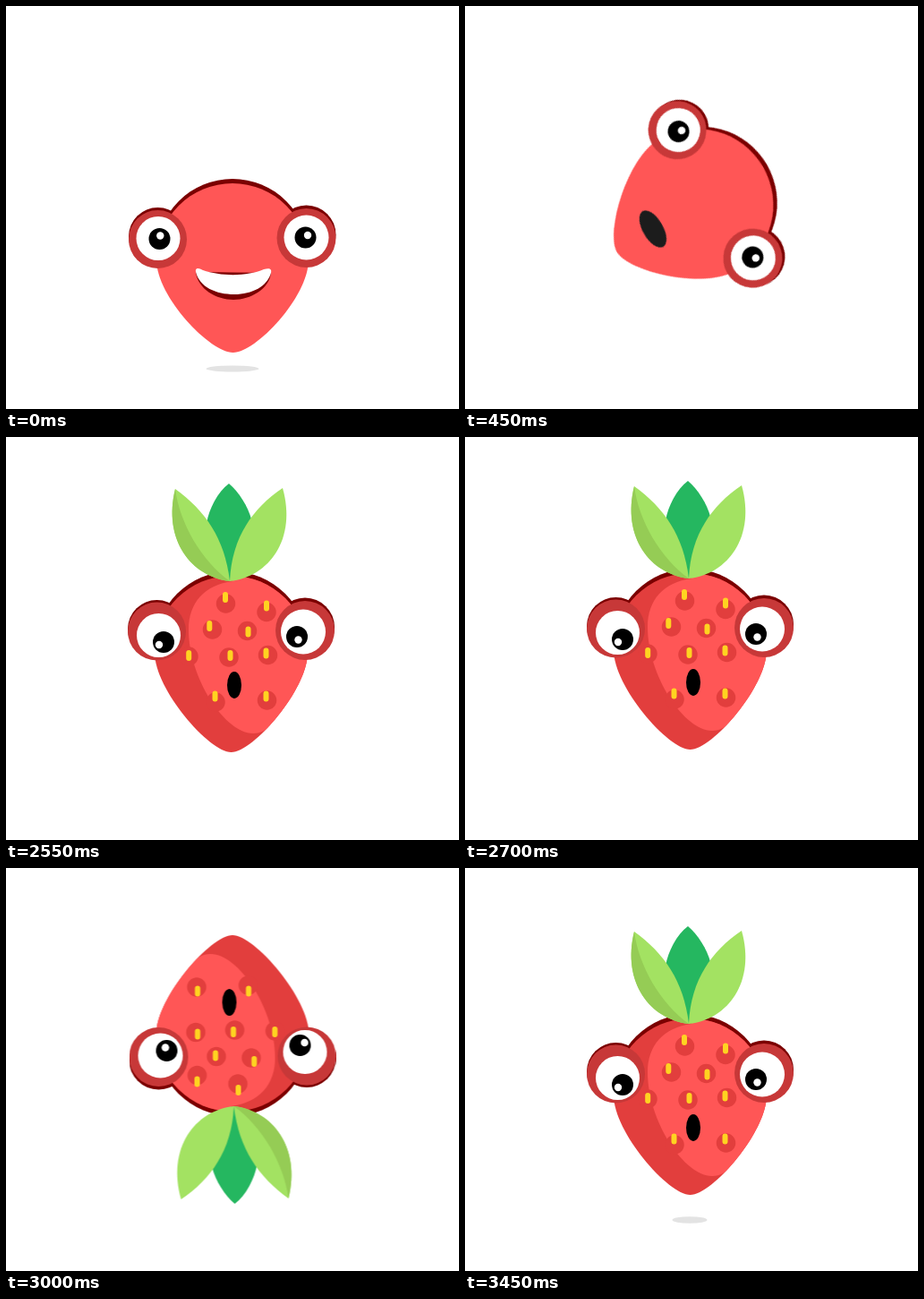
Write an HTML page that moves like this. It is 506 px wide and 450 px high and loops after 3600 ms.

```html
<!DOCTYPE html>
<html lang="en">
<head>
<meta charset="utf-8">
<title>Rolling strawberry</title>
<style>
  html, body { margin: 0; width: 100%; height: 100%; overflow: hidden; background: #fff; }
  svg { display: block; width: 506px; height: 450px; }

  .maroon { fill: #7b0000; }
  .flesh { fill: #ff5656; }
  .shade { fill: #e23e3d; }
  .ring { fill: #c73838; }
  .white { fill: #fff; }
  .leaf { fill: #a3e262; }
  .shadow { fill: #e3e3e3; }
  .spots { stroke: #e23e3d; stroke-width: 21.5; stroke-linecap: round; }
  .pips { stroke: #ffd321; stroke-width: 6; stroke-linecap: round; }

  /* Everything moves in hard 150 ms steps. */
  .face, .berry, .smile, .gasp, .blank, .face-shadow, .berry-shadow {
    animation: 3600ms step-end infinite;
  }
  .face { transform-origin: 252.5px 259.5px; animation-name: roll-out; }
  .berry { transform-origin: 251.5px 202px; animation-name: roll-in; }
  .smile { animation-name: smile; }
  .gasp { animation-name: gasp; }
  .blank { animation-name: blank; }
  .face-shadow { animation-name: face-shadow; }
  .berry-shadow { animation-name: berry-shadow; }

  @keyframes roll-out {
    0% { visibility: visible; transform: none; }
    4.1667% { transform: translate(0, -20px); }
    8.3333% { transform: translate(12.5px, -63.5px) rotate(24deg); }
    12.5% { visibility: visible; transform: translate(27px, -49.5px) rotate(60deg); }
    16.6667%, 100% { visibility: hidden; transform: none; }
  }
  @keyframes roll-in {
    0% { visibility: hidden; transform: none; }
    70.8333% { visibility: visible; transform: none; }
    75% { transform: translate(0, -3px); }
    79.1667% { transform: translate(1.5px, 23px) rotate(90deg); }
    83.3333% { transform: translate(1.5px, 23px) rotate(180deg); }
    87.5% { transform: translate(1.5px, 23px) rotate(270deg); }
    91.6667% { transform: translate(2px, 18.5px); }
    95.8333%, 100% { visibility: visible; transform: translate(0, 13px); }
  }
  @keyframes smile { 0% { opacity: 1; } 8.3333%, 100% { opacity: 0; } }
  @keyframes gasp { 0% { opacity: 0; } 8.3333%, 100% { opacity: 1; } }
  @keyframes blank { 0% { opacity: 0; } 16.6667% { opacity: 1; } 70.8333%, 100% { opacity: 0; } }
  @keyframes face-shadow { 0% { opacity: 1; } 4.1667%, 100% { opacity: 0; } }
  @keyframes berry-shadow { 0% { opacity: 0; } 95.8333%, 100% { opacity: 1; } }
</style>
</head>
<body>
<svg viewBox="0 0 506 450" fill="none">
  <defs>
    <path id="face-body" d="M168 283A85 85 0 0 1 338 283C338 325 279 387 253.500 387S168 325 168 283Z"/>
    <path id="berry-body" d="M166 240.500A85.500 85.500 0 0 1 337 240.500C337 282 276 352 251.500 352S166 282 166 240.500Z"/>
    <clipPath id="berry-clip"><use href="#berry-body"/></clipPath>
  </defs>

  <rect class="blank" x=".5" y=".5" width="505" height="449" stroke="#c4c4c4"/>
  <ellipse class="shadow face-shadow" cx="253" cy="405" rx="29.500" ry="3.500"/>
  <ellipse class="shadow berry-shadow" cx="251" cy="393" rx="19.500" ry="3.800"/>

  <g class="face">
    <use href="#face-body" class="maroon" y="-5"/>
    <circle class="maroon" cx="169.500" cy="257.500" r="32.500"/>
    <circle class="maroon" cx="335.500" cy="255.500" r="33"/>
    <use href="#face-body" class="flesh"/>

    <circle class="ring" cx="169.500" cy="260.500" r="32.500"/>
    <circle class="white" cx="170" cy="259.500" r="24.500"/>
    <circle cx="171.500" cy="260" r="12" fill="#000"/>
    <circle class="white" cx="172.300" cy="256.500" r="4.200"/>

    <circle class="ring" cx="335.500" cy="259" r="33"/>
    <circle class="white" cx="335.500" cy="258.500" r="25"/>
    <circle cx="334.500" cy="258.500" r="12" fill="#000"/>
    <circle class="white" cx="337" cy="256" r="4.200"/>

    <g class="smile">
      <path class="maroon" d="M212 297C214 316 235 328 254 328S294 316 296 298Z"/>
      <path class="white" d="M212 297C211 292 215 292 220 295C240 302 270 302 288 294C295 292 297 294 296 298C292 313 275 322 255 322S216 314 212 297Z"/>
    </g>
    <ellipse class="gasp" cx="251.500" cy="339.200" rx="23" ry="11.300" fill="#1c1c1c"/>
  </g>

  <g class="berry">
    <use href="#berry-body" class="maroon" y="-5"/>
    <circle class="maroon" cx="168.500" cy="214.500" r="32.500"/>
    <circle class="maroon" cx="334" cy="212.500" r="33"/>
    <use href="#berry-body" class="shade"/>
    <path class="flesh" clip-path="url(#berry-clip)" d="M253 161C222 165 204 185 204 215C204 270 245 331 276 331C285 331 292 326 297 321L345 300V150H253Z"/>
    <path class="spots" d="M245.500 186h.01M291 195.500h.01M230.500 215h.01M269.500 216.500h.01M204 245h.01M249 246h.01M292.500 243.500h.01M234 296h.01M291.500 294h.01"/>
    <path class="pips" d="M245 176v6M291 185.500v6M227.300 208v6M270.500 214.500v6M204.200 241v6M250.500 241v6M290.500 238.500v6M233.500 286.500v6M290.500 286.500v6"/>

    <path fill="#25b760" d="M249 52C236 62 227 80 224 96Q235 140 250 161Q265 130 274.500 93C270 77 260 61 249 52Z"/>
    <path class="leaf" d="M189 58C222 82 244 112 250 161C207 156 175 115 189 58Z"/>
    <path fill="#95cc55" d="M189 58C194 96 218 138 250 161C207 156 175 115 189 58Z"/>
    <path class="leaf" d="M309 57C276 79 252 112 250 161C294 156 325 114 309 57Z"/>

    <circle class="ring" cx="168.500" cy="217" r="32.500"/>
    <circle class="white" cx="170.500" cy="221.500" r="24.500"/>
    <circle cx="176" cy="229" r="12" fill="#000"/>
    <circle class="white" cx="171" cy="232" r="4.200"/>

    <circle class="ring" cx="334" cy="216" r="33"/>
    <circle class="white" cx="332" cy="217.500" r="25"/>
    <circle cx="325" cy="223" r="12" fill="#000"/>
    <circle class="white" cx="326.500" cy="226.500" r="4.200"/>

    <ellipse cx="255" cy="277" rx="8" ry="15" fill="#000"/>
  </g>
</svg>
</body>
</html>
```
